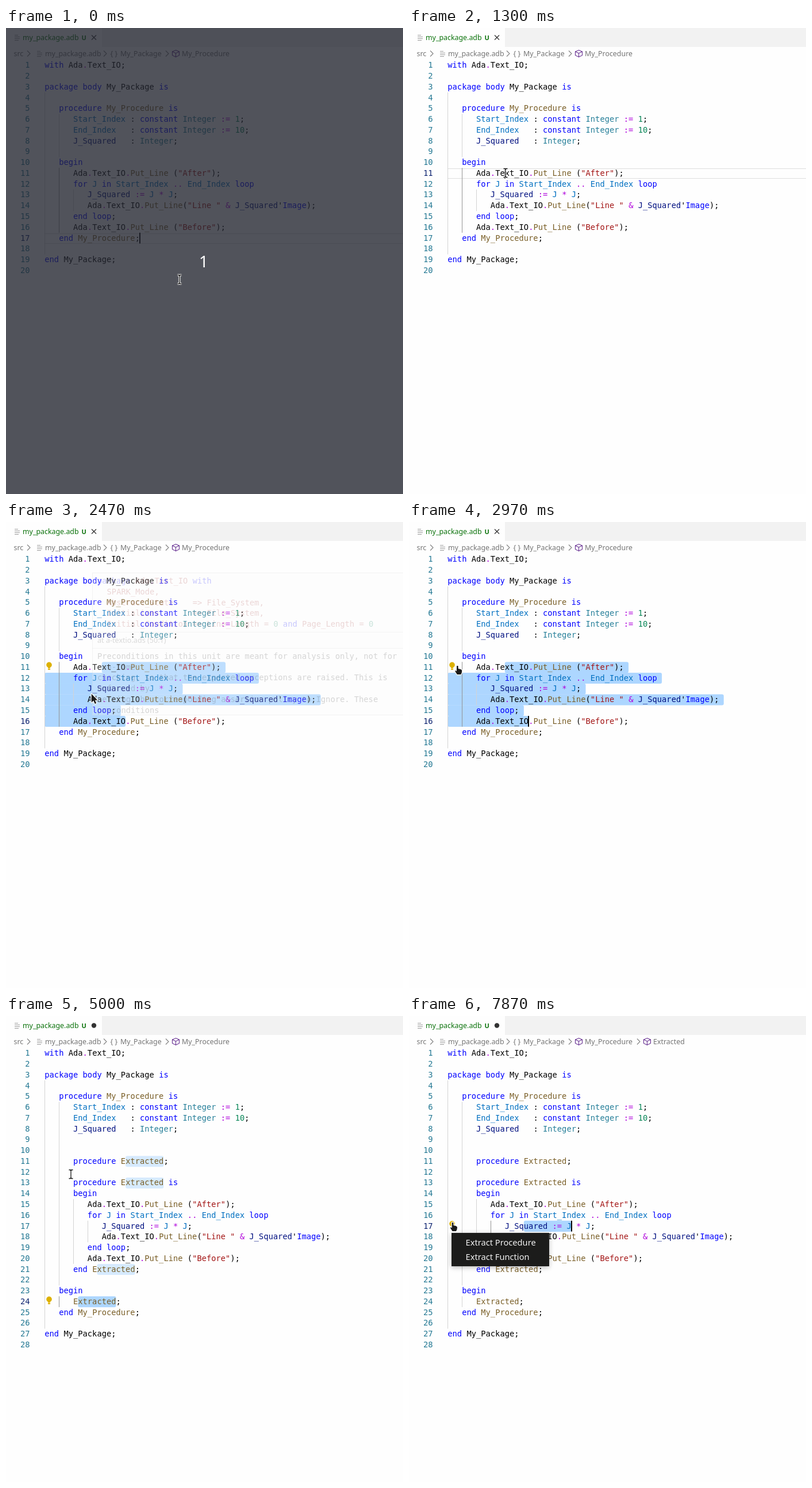
An HTML page with a canvas for the animation above (8 s loop, 691x810 px).

```html
<!DOCTYPE html>
<html lang="en">
<head>
<meta charset="utf-8">
<title>Extract procedure</title>
<style>
html, body { margin: 0; width: 100%; height: 100%; overflow: hidden; background: #fefefe; }
canvas { display: block; width: 691px; height: 810px; }
</style>
</head>
<body>
<canvas id="stage"></canvas>
<script>
const W = 691, H = 810, LOOP = 8000;
const X0 = 67.3, CELL = 8.285, TOP = 55.5, ROW = 18.77;
const MONO = '13.75px "DejaVu Sans Mono", monospace';
const ui = size => `${size}px "Noto Sans", "Open Sans", sans-serif`;

const canvas = document.getElementById('stage');
const ctx = canvas.getContext('2d');
const dpr = window.devicePixelRatio || 1;
canvas.width = W * dpr;
canvas.height = H * dpr;

const before = `with Ada.Text_IO;

package body My_Package is

   procedure My_Procedure is
      Start_Index : constant Integer := 1;
      End_Index   : constant Integer := 10;
      J_Squared   : Integer;

   begin
      Ada.Text_IO.Put_Line ("After");
      for J in Start_Index .. End_Index loop
         J_Squared := J * J;
         Ada.Text_IO.Put_Line("Line " & J_Squared'Image);
      end loop;
      Ada.Text_IO.Put_Line ("Before");
   end My_Procedure;

end My_Package;
`.split('\n');

const after = [
  ...before.slice(0, 9), '',
  '      procedure Extracted;', '',
  '      procedure Extracted is',
  ...before.slice(9, 16).map(line => '   ' + line),
  '      end Extracted;', '',
  '   begin', '      Extracted;',
  ...before.slice(16)
];

const hoverCode = [
  'package Ada.Text_IO with',
  '  SPARK_Mode,',
  '  Abstract_State    => File_System,',
  '  Initializes       => File_System,',
  '  Initial_Condition => Line_Length = 0 and Page_Length = 0'
];
const hoverNotes = [
  'Preconditions in this unit are meant for analysis only, not for',
  'run-time',
  'checking, so that the expected exceptions are raised. This is',
  'enforced by',
  'setting the corresponding assertion policy to Ignore. These',
  'preconditions'
];

const colorRules = [
  [/^"/, '#a31515'],
  [/^\d/, '#098658'],
  [/^(with|package|body|is|procedure|constant|begin|for|in|loop|end|and|Image)$/, '#0000ff'],
  [/^(Put_Line|My_Procedure|Extracted)$/, '#795e26'],
  [/^Integer$/, '#267f99'],
  [/^(Start_Index|End_Index|J)$/, '#0070c1'],
  [/^J_Squared$/, '#001080'],
  [/^(:=|\.+|&|\*)$/, '#af00db']
];

const rowTop = row => TOP + (row - 1) * ROW;
const colX = col => X0 + col * CELL;
const clamp = (v, lo, hi) => Math.min(hi, Math.max(lo, v));
const within = (t, a, b) => t >= a && t < b;

function rect(x, y, w, h, color) {
  ctx.fillStyle = color;
  ctx.fillRect(x, y, w, h);
}

function text(s, x, y, color, font, align = 'left') {
  ctx.font = font;
  ctx.fillStyle = color;
  ctx.textAlign = align;
  ctx.fillText(s, x, y);
}

function stroke(points, color, width, close) {
  ctx.beginPath();
  points.forEach(([x, y]) => ctx.lineTo(x, y));
  if (close) ctx.closePath();
  ctx.strokeStyle = color;
  ctx.lineWidth = width;
  ctx.stroke();
}

function dot(x, y, r, color) {
  ctx.beginPath();
  ctx.arc(x, y, r, 0, 7);
  ctx.fillStyle = color;
  ctx.fill();
}

function codeLine(line, x, y, plain = '#000') {
  let col = 0;
  for (const token of line.match(/"[^"]*"|\w+|:=|\.+|\s+|./g) || []) {
    const rule = colorRules.find(([pattern]) => pattern.test(token));
    if (token.trim()) text(token, x + col * CELL, y, rule ? rule[1] : plain, MONO);
    col += token.length;
  }
}

// Pointer path: time, x, y; each leg is eased.
const path = [
  [0, 302, 437], [330, 302, 437], [1000, 160, 257], [1130, 168, 252],
  [1330, 168, 252], [1670, 208, 346], [2070, 208, 346], [2870, 90, 252],
  [3100, 76, 247], [3640, 76, 247], [4130, 113, 275], [5430, 113, 275],
  [6150, 201, 365], [6270, 202, 365], [6550, 283, 365], [6950, 283, 365],
  [7550, 76, 359], [LOOP, 76, 359]
];

function pointerAt(t) {
  const i = path.findIndex(p => p[0] > t);
  const [t0, x0, y0] = path[i - 1], [t1, x1, y1] = path[i];
  const u = (t - t0) / (t1 - t0), e = u * u * (3 - 2 * u);
  return [x0 + (x1 - x0) * e, y0 + (y1 - y0) * e];
}

function pointerShape(t) {
  if (within(t, 2900, 3700) || t >= 7450) return hand;
  if (within(t, 2440, 2700) || within(t, 3700, 4500)) return arrow;
  return iBeam;
}

function iBeam(x, y) {
  for (const [color, width] of [['#fff', 3.4], ['#111', 1.3]]) {
    stroke([[x, y - 7], [x, y + 7]], color, width);
    for (const s of [-1, 1]) {
      stroke([[x - 3.5, y + s * 7.5], [x - 1, y + s * 7.5], [x, y + s * 6.5],
        [x + 1, y + s * 7.5], [x + 3.5, y + s * 7.5]], color, width);
    }
  }
}

function outlined(x, y, shape) {
  const points = shape.map(([dx, dy]) => [x + dx, y + dy]);
  ctx.lineJoin = 'round';
  stroke(points, '#fff', 2.4, true);
  ctx.fillStyle = '#1a1a1a';
  ctx.fill();
  ctx.lineJoin = 'miter';
}

function arrow(x, y) {
  outlined(x, y, [[0, 0], [0, 15], [3.5, 11.8], [6, 17.3], [8.4, 16.2], [6, 11], [10.5, 10.6]]);
}

function hand(x, y) {
  outlined(x, y, [[-1.2, 0], [1.2, 0], [1.5, 5], [6, 6], [8, 8], [7.5, 12],
    [6, 15], [-0.5, 15], [-4, 9.5], [-3.6, 8], [-1.4, 9.5]]);
}

function fileIcon(x, y) {
  [6, 9, 9, 7].forEach((w, i) => rect(x, y + i * 3, w, 1, '#9a9a9a'));
}

function chevron(x) {
  stroke([[x - 2, 39.5], [x + 3, 44.5], [x - 2, 49.5]], '#808080', 1.1);
}

function cube(x) {
  const c = '#652d90', y = 44.5;
  stroke([[x, y - 6], [x + 6, y - 3.5], [x + 6, y + 3], [x, y + 6], [x - 6, y + 3],
    [x - 6, y - 3.5]], c, 1.1, true);
  stroke([[x - 6, y - 3.5], [x, y - 0.5], [x + 6, y - 3.5]], c, 1.1);
  stroke([[x, y - 0.5], [x, y + 6]], c, 1.1);
}

function header(dirty, nested) {
  const green = '#0b720b', gray = '#757575', font = ui(12.4);
  rect(167, 0, W - 167, 33, '#f2f2f2');
  fileIcon(15, 12);
  text('my_package.adb', 29, 21, green, font);
  text('U', 131.5, 20.5, green, '600 11px "Noto Sans", sans-serif');
  if (dirty) dot(153, 16.5, 4.2, '#333');
  else {
    stroke([[149, 12.5], [157, 20.5]], '#333', 1.2);
    stroke([[157, 12.5], [149, 20.5]], '#333', 1.2);
  }
  text('src', 13.5, 49, gray, font);
  fileIcon(54, 40);
  text('my_package.adb', 68, 49, gray, font);
  text('{ }', 181.5, 49, gray, ui(12.4));
  text('My_Package', 199, 49, gray, font);
  text('My_Procedure', 306, 49, gray, font);
  [39, 172, 280].forEach(chevron);
  cube(295.5);
  if (nested) {
    chevron(399);
    cube(414.5);
    text('Extracted', 425, 49, gray, font);
  }
}

function band(row, c1, c2, color) {
  ctx.beginPath();
  ctx.roundRect(colX(c1), rowTop(row), (c2 - c1) * CELL, ROW + 0.3, 3);
  ctx.fillStyle = color;
  ctx.fill();
}

function selection(lines, [r1, c1], [r2, c2]) {
  for (let r = r1; r <= r2; r++) {
    const from = r === r1 ? c1 : 0;
    const to = r === r2 ? c2 : lines[r - 1].length + 1;
    if (to > from) band(r, from, to, '#add6ff');
  }
}

function guide(col, from, to, active) {
  rect(Math.round(colX(col)), rowTop(from), 1, (to - from + 1) * ROW, active ? '#939393' : '#d3d3d3');
}

function bulb(row) {
  const y = rowTop(row) + 5.2;
  dot(75, y, 4.8, '#ddb100');
  rect(73, y + 3, 4, 5.5, '#ddb100');
  rect(73, y + 5.6, 4, 0.8, '#fff2c0');
}

function lineFrame(row) {
  ctx.strokeStyle = '#dedede';
  ctx.lineWidth = 1;
  ctx.strokeRect(67.5, Math.round(rowTop(row)) + 1.5, W, 17);
}

function hoverCard(alpha) {
  ctx.globalAlpha = alpha;
  rect(150, 88, W - 150, 248, '#f8f8f8');
  ctx.strokeStyle = '#c8c8c8';
  ctx.lineWidth = 1;
  ctx.strokeRect(150.5, 88.5, W, 247);
  hoverCode.forEach((line, i) => codeLine(line, 159, 107 + i * 18.75, '#a84848'));
  rect(150, 191, W - 150, 1, '#d0d0d0');
  text('at a-textio.ads (50:1)', 159, 210, '#555', ui(12.6));
  rect(150, 219, W - 150, 1, '#d0d0d0');
  hoverNotes.forEach((line, i) => text(line, 159, 238 + i * 18.7, '#444', MONO));
  ctx.globalAlpha = 1;
}

function menu(x, y, items, active, alpha) {
  const h = 9 + items.length * 24.5;
  ctx.save();
  ctx.globalAlpha = alpha;
  ctx.shadowColor = 'rgba(0,0,0,.28)';
  ctx.shadowBlur = 8;
  ctx.shadowOffsetY = 2;
  rect(x, y, 170, h, '#1c1c1b');
  ctx.shadowColor = 'transparent';
  if (active) rect(x + 1, y + 4, 168, 25, '#3b3b39');
  items.forEach((s, i) => text(s, x + 24.5, y + 22 + i * 24.8, '#f2f2f2', ui(14.67)));
  ctx.restore();
}

function editorState(t, mouse) {
  const mouseCol = Math.round((mouse[0] - X0) / CELL);
  if (t < 1170) return { caret: [17, 20], frame: 17 };
  if (t < 1330) return { caret: [11, 12], frame: 11 };
  if (t < 4500) {
    const row = clamp(Math.floor((mouse[1] - TOP) / ROW) + 1, 11, 16);
    const caret = t < 1670 ? [row, Math.min(mouseCol, before[row - 1].length)] : [16, 17];
    return { caret, from: [11, 12], bulb: t >= 1830 && 11 };
  }
  if (t < 6200) {
    const marked = t >= 4770;
    return { caret: [24, 15], from: [24, 7], marked, bulb: marked && 24 };
  }
  const col = t < 6550 ? clamp(mouseCol, 16, 26) : 26;
  return { caret: [17, col], from: [17, 16], bulb: t < 6650 ? 24 : t >= 6850 && 17 };
}

const caretOff = [[170, 670], [2170, 2670], [3130, 3630], [5000, 5500], [6000, 6200], [7050, 7550]];

function draw(t) {
  const mouse = pointerAt(t);
  const state = editorState(t, mouse);
  const extracted = t >= 4500;
  const lines = extracted ? after : before;
  const [caretRow, caretCol] = state.caret;

  ctx.setTransform(dpr, 0, 0, dpr, 0, 0);
  rect(0, 0, W, H, '#fefefe');
  header(extracted, t >= 6620);

  if (state.frame) lineFrame(state.frame);
  if (state.marked) {
    for (const [row, col] of [[11, 17], [13, 17], [21, 11]]) band(row, col, col + 8, '#d6eafe');
  }
  if (state.from) selection(lines, state.from, state.caret);

  const inner = t >= 6200;
  const guides = extracted
    ? [[0, 4, 26], [3, 6, 22], [3, 24, 24, !inner], [6, 15, 20], [9, 17, 18, inner]]
    : [[0, 4, 18], [3, 6, 9], [3, 11, 16, true], [6, 13, 14]];
  guides.forEach(g => guide(...g));

  lines.forEach((line, i) => {
    const y = Math.round(rowTop(i + 1) + 13.7);
    text(i + 1, 41.5, y, i + 1 === caretRow ? '#0b216f' : '#237893', MONO, 'right');
    codeLine(line, X0, y);
  });

  if (!caretOff.some(([a, b]) => within(t, a, b))) {
    rect(Math.round(colX(caretCol)) - 1, rowTop(caretRow), 2, ROW, '#000');
  }
  if (state.bulb) bulb(state.bulb);
  if (within(t, 2450, 2700)) hoverCard(clamp((t - 2450) / 100, 0, 1));
  if (within(t, 3630, 4500)) {
    menu(78, 265, ['Extract Procedure'], mouse[1] > 266, clamp((t - 3600) / 90, 0, 1));
  }
  if (t >= 7680) {
    menu(74, 377, ['Extract Procedure', 'Extract Function'], false, clamp((t - 7650) / 120, 0, 1));
  }
  if (t < 30) {
    rect(0, 0, W, H, 'rgba(35,38,47,.79)');
    text('1', 344, 416, '#fff', ui(28), 'center');
  }
  pointerShape(t)(...mouse);
}

const start = performance.now();
function tick() {
  draw((performance.now() - start) % LOOP);
  requestAnimationFrame(tick);
}
tick();
</script>
</body>
</html>
```
